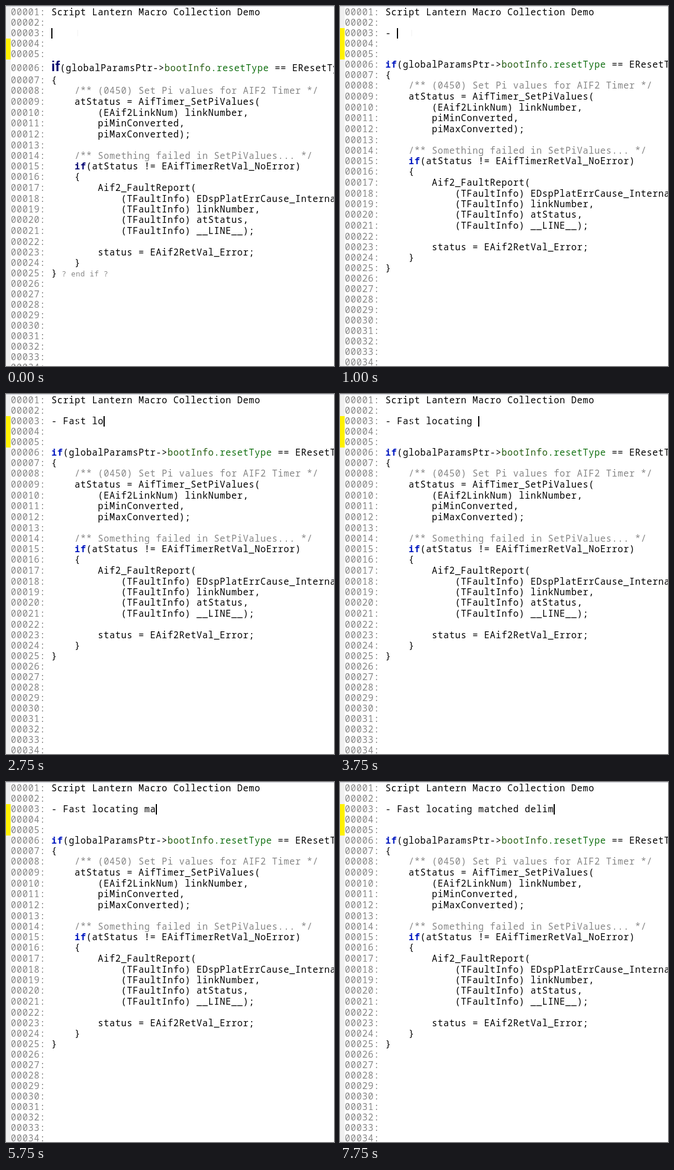
Animation, 565 px wide and 619 px high, one loop 8 s. Source, as an HTML page with a canvas:

```html
<!DOCTYPE html>
<html lang="en">
<head>
<meta charset="utf-8">
<title>Editor typing</title>
<style>
html, body { margin: 0; width: 100%; height: 100%; overflow: hidden; background: #fff; }
canvas { display: block; }
</style>
</head>
<body>
<canvas id="stage" width="565" height="619"></canvas>
<script>
const ctx = document.getElementById('stage').getContext('2d');
const LOOP = 8000, TICK = 250, CELL = 10, LEFT = 78, ROW = 18;
const GRAY = '#868686';

const code = `Script Lantern Macro Collection Demo




if(globalParamsPtr->bootInfo.resetType == EResetType_PowerOn)
{
    /** (0450) Set Pi values for AIF2 Timer */
    atStatus = AifTimer_SetPiValues(
        (EAif2LinkNum) linkNumber,
        piMinConverted,
        piMaxConverted);

    /** Something failed in SetPiValues... */
    if(atStatus != EAifTimerRetVal_NoError)
    {
        Aif2_FaultReport(
            (TFaultInfo) EDspPlatErrCause_Internal,
            (TFaultInfo) linkNumber,
            (TFaultInfo) atStatus,
            (TFaultInfo) __LINE__);

        status = EAif2RetVal_Error;
    }
}`.split('\n');

// Keys pressed in each tick, separated by |; ~ toggles the caret
const keys = '|~||-| ||F|a|s|t| |lo|ca|ti|ng| ||~|||~|~||ma|t|ch|e|d |de|l||im'.split('|');

function typedAt(tick) {
  let text = '', caret = true;
  for (const key of keys.slice(0, tick + 1)) {
    if (key === '~') caret = !caret;
    else if (key) {
      text += key;
      caret = true;
    }
  }
  return { text, caret };
}

function rect(x, y, w, h, color) {
  ctx.fillStyle = color;
  ctx.fillRect(x, y, w, h);
}

// Monospaced text with a slightly open tracking
function put(text, x, y, color = '#000', weight = 400, cell = CELL) {
  const tracking = cell * 0.07;
  ctx.font = `${weight} ${cell * 1.55}px "Noto Sans Mono", monospace`;
  ctx.letterSpacing = tracking + 'px';
  ctx.fillStyle = color;
  ctx.fillText(text, x + tracking / 2, y);
}

function putLargeKeyword(text, x, y, color) {
  ctx.font = 'bold 24px "Liberation Sans", sans-serif';
  ctx.letterSpacing = '0px';
  ctx.fillStyle = color;
  ctx.fillText(text, x, y);
  return ctx.measureText(text).width;
}

function baseline(row, formatted) {
  // Each of these rows and the one after it sit one pixel lower
  const extra = [9, 12, 17, 21].reduce((sum, r) => sum + Math.min(2, Math.max(0, row - r + 1)), 0);
  const shift = !formatted || row < 6 ? 0 : row === 6 ? 6 : 9;
  return 16 + (row - 1) * ROW + extra + shift;
}

function colorOf(part) {
  if (part.startsWith('/*')) return GRAY;
  if (part === 'bootInfo') return '#235c10';
  return part === '.resetType' ? '#127012' : '#000';
}

function drawCode(line, row, y, formatted) {
  const keyword = formatted ? '#000070' : '#0018c0';
  let x = LEFT;
  for (const part of line.split(/(\/\*.*\*\/|\bif\b|bootInfo|\.resetType)/)) {
    if (part === 'if' && formatted && row === 6) {
      x += putLargeKeyword(part, x, y, keyword);
      continue;
    }
    if (part === 'if') put(part, x, y, keyword, 700);
    else put(part, x, y, colorOf(part));
    x += part.length * CELL;
  }
}

function draw(t) {
  const { text, caret } = typedAt(Math.floor(t / TICK));
  const formatted = t < 1000;
  const markTop = text ? 38 : 56;
  rect(0, 0, 565, 619, '#fff');
  rect(0, 0, 8, 619, '#f0f0f0');
  rect(0, markTop, 8, 92 - markTop, '#fff200');
  rect(0, 0, 565, 1, '#c4c6d0');

  for (let row = 1; row <= 34; row++) {
    const y = baseline(row, formatted);
    put(String(row).padStart(5, '0') + ':', 8, y, GRAY);
    drawCode(row === 3 ? text : code[row - 1] || '', row, y, formatted);
  }
  if (formatted) put('? end if ?', 96, baseline(25, true), GRAY, 400, 8);
  rect(123, 41, 1, 11, '#f2f2f2');
  if (caret) rect(LEFT + text.length * CELL, 38, 2, 18, '#000');
}

function tick() {
  draw(performance.now() % LOOP);
  requestAnimationFrame(tick);
}
tick();
</script>
</body>
</html>
```
